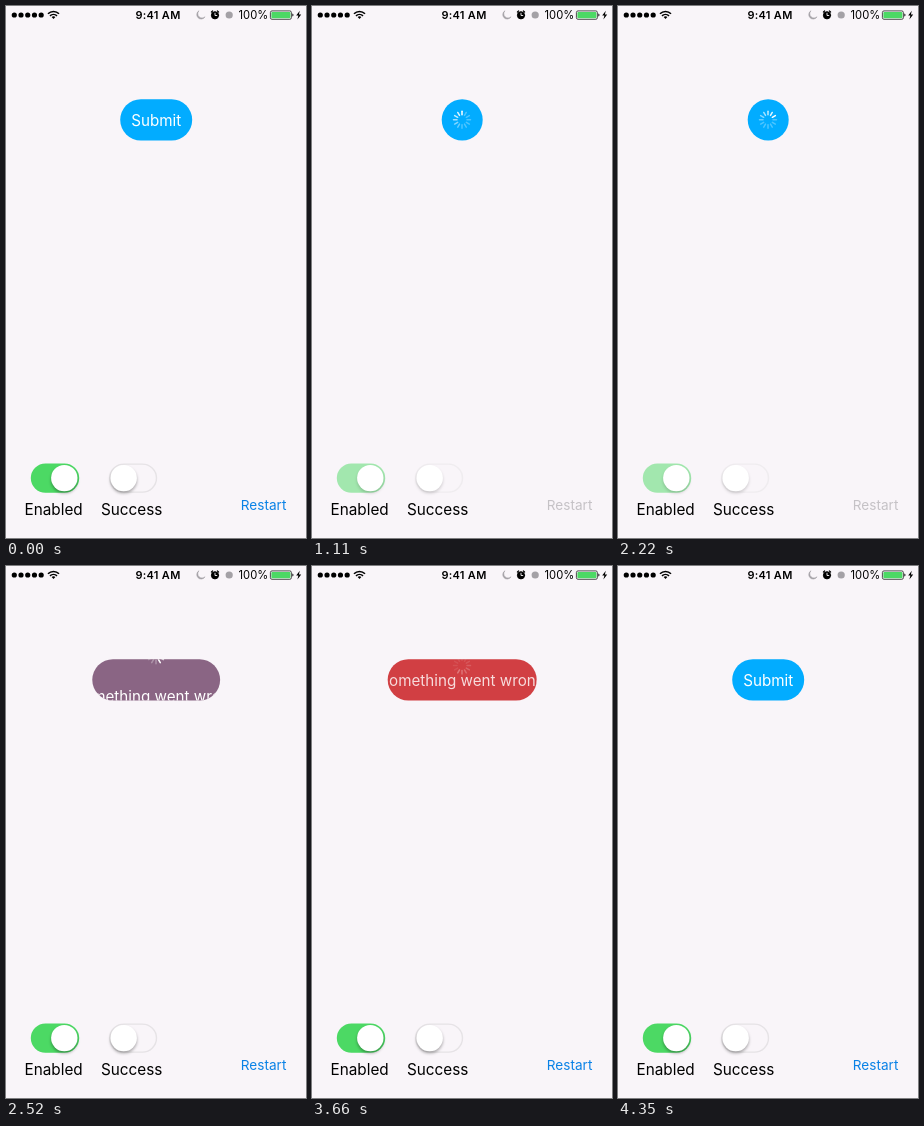
Recreate the animation shown at these times as an HTML page. Size 300x532 px, loop 4.47 s.

```html
<!DOCTYPE html>
<html lang="en">
<head>
<meta charset="utf-8">
<title>Submit button</title>
<style>
  html, body { margin: 0; width: 100%; height: 100%; overflow: hidden; background: #f9f5f9; }
  svg { display: block; width: 100vw; height: 100vh; }
  text { font-family: Inter, Roboto, sans-serif; text-anchor: middle; }
  .title { font-size: 15.2px; fill: #fff; }
  .caption { font-size: 15.3px; }
  .knob { fill: #fff; filter: drop-shadow(0 2px 1.6px rgba(0, 0, 0, .32)); }
  #restart { font-size: 13.6px; fill: #0a82e6; }
  .busy .track { opacity: .5; }
  .busy .knob { filter: drop-shadow(0 2px 1.6px rgba(0, 0, 0, .16)); }
  .busy #restart { fill: #c5c2c6; }
</style>
</head>
<body>
<svg id="stage" viewBox="0 0 300 532">
  <defs>
    <clipPath id="clip"><rect class="shape" y="93.2" height="41.3" rx="20.65"/></clipPath>
  </defs>
  <rect width="300" height="532" fill="#f9f5f9"/>

  <!-- Status bar -->
  <path d="M8.3 9h27" stroke="#000" stroke-width="5.2" stroke-linecap="round" stroke-dasharray="0 6.72"/>
  <g fill="none" stroke="#000" stroke-width="1.6">
    <path d="M42 7.7a7.8 7.8 0 0 1 11 0M44 9.9a5 5 0 0 1 7 0"/>
    <path d="M47.5 13l-1.9-1.9a2.7 2.7 0 0 1 3.8 0z" fill="#000" stroke="none"/>
  </g>
  <text x="152" y="13" font-size="11" font-weight="600" letter-spacing=".3">9:41 AM</text>
  <path d="M193 4.8a4.4 4.4 0 1 0 6 6a4.2 4.2 0 0 1-6-6z" fill="#a4a1a6" stroke="#a4a1a6" stroke-width=".6"/>
  <g fill="none" stroke="#000" stroke-linecap="round">
    <circle cx="209" cy="9.3" r="3.6" fill="#000"/>
    <path d="M205.4 6l1.2-1M212.6 6l-1.2-1" stroke-width="1.2"/>
    <path d="M209 7.2v2.3h1.8" stroke="#f9f5f9" stroke-width=".9"/>
  </g>
  <circle cx="223.2" cy="9" r="3.6" fill="#a4a1a6"/>
  <text x="247.4" y="13" font-size="11.2">100%</text>
  <rect x="264.4" y="4.9" width="21" height="8.4" rx="1.6" fill="none" stroke="#222" stroke-width=".8"/>
  <rect x="265.4" y="5.9" width="19" height="6.4" rx=".8" fill="#4cd964"/>
  <path d="M286.4 7.6a1.6 1.6 0 0 1 0 3z"/>
  <path d="M293.8 4.8l-3.6 4.8h2.2l-1 3.8l3.8-5h-2.3z"/>

  <!-- Button -->
  <rect class="shape" id="button" y="93.2" height="41.3" rx="20.65"/>
  <g clip-path="url(#clip)">
    <text class="title" id="submit" x="150.2" y="119.7">Submit</text>
    <g id="spinner" stroke="#fff" stroke-width="1.5" stroke-linecap="round"></g>
    <text class="title" id="error" x="150.2" y="119.7">Something went wrong</text>
  </g>

  <!-- Controls -->
  <rect class="track" x="24.8" y="457.4" width="48.4" height="29.4" rx="14.7" fill="#4cd964"/>
  <circle class="knob" cx="58.3" cy="472.1" r="13.2"/>
  <rect class="track" x="103.7" y="458.1" width="46.8" height="28" rx="14" fill="none" stroke="#e6e3e6" stroke-width="1.4"/>
  <circle class="knob" cx="117.7" cy="472.1" r="13.2"/>
  <text class="caption" x="47.6" y="509.2">Enabled</text>
  <text class="caption" x="125.7" y="509.2">Success</text>
  <text id="restart" x="257.6" y="504.3">Restart</text>
</svg>
<script>
const LOOP = 4470, SLIDE = 400, HEIGHT = 41;
const LOAD_AT = 540, FAIL_AT = 2295, RESET_AT = 3508;
const BLUE = [2, 172, 255], RED = [229, 53, 49];
const SPOKES = 12;

const byId = id => document.getElementById(id);
const set = (node, attributes) => {
  for (const name in attributes) node.setAttribute(name, attributes[name]);
};
const shapes = document.querySelectorAll('.shape');
const spinner = byId('spinner');

const spokes = Array.from({ length: SPOKES }, (_, i) => {
  const line = document.createElementNS('http://www.w3.org/2000/svg', 'line');
  set(line, { y1: -5, y2: -8.5, transform: `rotate(${i * 360 / SPOKES})` });
  return spinner.appendChild(line);
});

function ease(time, start, duration = SLIDE) {
  const x = Math.min(1, Math.max(0, (time - start) / duration));
  return x * x * (3 - 2 * x);
}

function draw(time) {
  const load = ease(time, LOAD_AT);
  const fail = ease(time, FAIL_AT);
  const reset = ease(time, RESET_AT);
  const redness = fail - ease(time, RESET_AT, 845);

  const width = 72 - 31 * load + 145.5 * fail - 114.5 * reset;
  shapes.forEach(shape => set(shape, { x: 150.2 - width / 2, width }));
  const color = BLUE.map((c, i) => Math.round(c + (RED[i] - c) * redness));
  set(byId('button'), { fill: `rgb(${color})` });

  set(byId('submit'), { transform: `translate(0 ${HEIGHT * (reset - load)})` });
  set(byId('error'), { transform: `translate(0 ${HEIGHT * (1 - fail)})`, opacity: 1 - reset ** 1.5 });

  // The spinner enters from below, leaves upwards and drops back on reset.
  const spinnerY = 113.8 + HEIGHT * (1 - load - fail + 2 * reset);
  set(spinner, { transform: `translate(150 ${spinnerY})`, opacity: (1 - reset) ** 3 });
  const head = Math.floor(time * SPOKES / 1000 + 11.5);
  spokes.forEach((spoke, i) => {
    const age = (head - i + SPOKES) % SPOKES;
    set(spoke, { opacity: Math.max(.3, 1 - age * .12) });
  });

  byId('stage').classList.toggle('busy', time >= LOAD_AT && time < FAIL_AT);
}

const begin = performance.now();
function tick() {
  draw((performance.now() - begin) % LOOP);
  requestAnimationFrame(tick);
}
tick();
</script>
</body>
</html>
```
